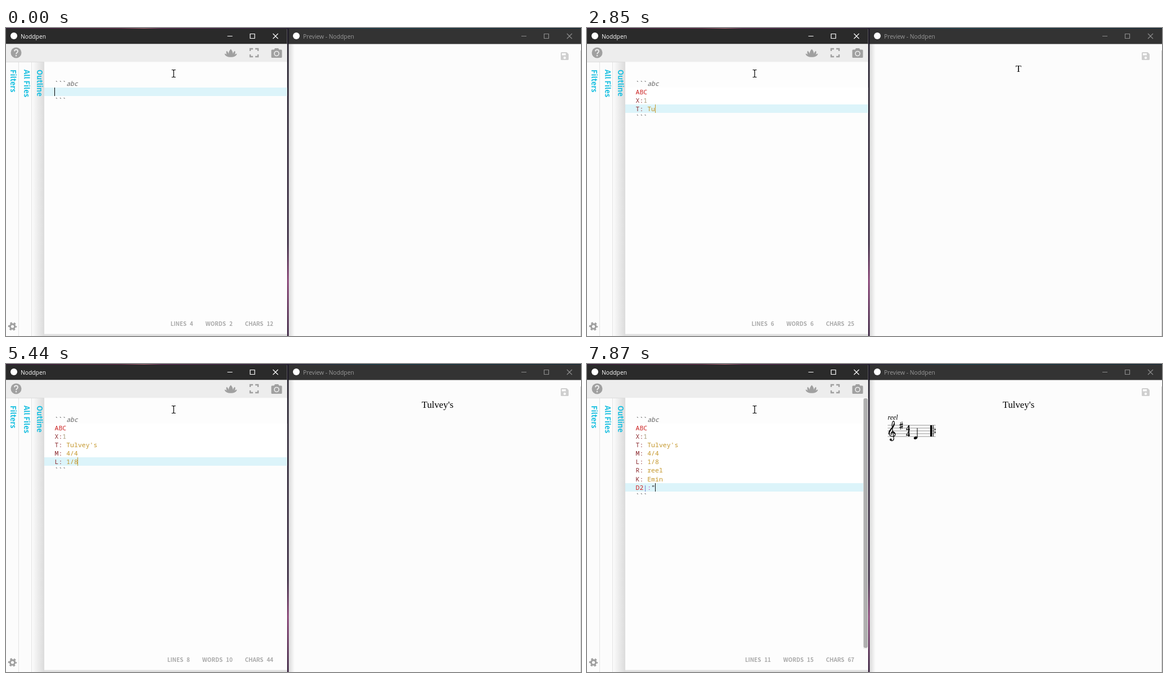
These frames come from a looping animation (1022 by 548 pixels, 8000 ms). An HTML page:

```html
<!DOCTYPE html>
<html lang="en">
<head>
<meta charset="utf-8">
<title>Live notation preview</title>
<style>
html, body { margin: 0; width: 100%; height: 100%; overflow: hidden; background: #fcfcfc; }
svg { display: block; }
text { white-space: pre; }
.bar { font: 10.3px "Open Sans", sans-serif; }
.tab { font: bold 13px "Noto Sans CJK JP", "Noto Sans", sans-serif; fill: #18bfe0; }
.count { font: bold 9.8px "Noto Sans CJK JP", "Noto Sans", sans-serif; fill: #a8a8a8; }
.code { font: 11.5px "Noto Sans Mono", monospace; fill: #555; }
.serif { font-family: "Liberation Serif", serif; }
.line { fill: none; stroke: #000; }
</style>
</head>
<body>
<svg width="1022" height="548" viewBox="0 0 1022 548">
  <defs>
    <linearGradient id="sky">
      <stop offset="0" stop-color="#35133c"/><stop offset=".2" stop-color="#6d2650"/>
      <stop offset=".24" stop-color="#b66a80"/><stop offset=".27" stop-color="#6a2560"/>
      <stop offset=".5" stop-color="#251a3c"/><stop offset=".65" stop-color="#0c4054"/>
      <stop offset="1" stop-color="#0d2435"/>
    </linearGradient>
    <linearGradient id="gap" x2="0" y2="1">
      <stop offset="0" stop-color="#1d1a26"/><stop offset=".7" stop-color="#2b1a33"/>
      <stop offset=".82" stop-color="#7d3169"/><stop offset="1" stop-color="#2d1634"/>
    </linearGradient>
    <linearGradient id="shade">
      <stop offset="0" stop-color="#000" stop-opacity="0"/><stop offset="1" stop-color="#000" stop-opacity=".13"/>
    </linearGradient>
    <g id="buttons" fill="none" stroke-width="1.2">
      <path d="M0 14.5h9M40.5 10.5h8v8h-8zM81 10l9 9m0-9l-9 9"/>
    </g>
  </defs>

  <rect width="1022" height="548" fill="#fcfcfc"/>
  <rect width="1022" height="2" fill="url(#sky)"/>

  <!-- preview window -->
  <rect x="502" y="1" width="520" height="27.5" fill="#333"/>
  <circle cx="516" cy="14" r="6" fill="#fff"/>
  <text class="bar" x="528" y="18.5" fill="#999">Preview - Noddpen</text>
  <use href="#buttons" x="916" stroke="#8c8c8c"/>
  <rect x="-513" y="28.5" width="10" height="520" fill="url(#shade)" transform="scale(-1 1)"/>
  <path d="M1021.5 40V548" stroke="#ccc"/>
  <path d="M987.5 43h9l3.500 3.500v9a1.500 1.500 0 0 1-1.500 1.500h-11a1.500 1.500 0 0 1-1.500-1.500v-11a1.500 1.500 0 0 1 1.500-1.500z" fill="#cfcfcf"/>
  <path d="M988 45h7v3.500h-7z" fill="#fcfcfc"/>
  <circle cx="993" cy="53" r="2.200" fill="#fcfcfc"/>
  <rect x="499.500" y="1" width="3" height="547" fill="url(#gap)"/>

  <!-- editor window -->
  <rect y="1" width="499.500" height="27.500" fill="#2a2a2a"/>
  <circle cx="14" cy="14" r="6" fill="#fff"/>
  <text class="bar" x="26" y="18.500" fill="#fff">Noddpen</text>
  <use href="#buttons" x="393.500" stroke="#fff"/>
  <rect y="28.500" width="499.500" height="32" fill="#ededed"/>
  <path d="M0 60.500H68" stroke="#ddd"/>
  <path d="M22.500 61V548M45.500 61V548" stroke="#e2e2e2"/>
  <rect x="46" y="61" width="22" height="487" fill="url(#shade)"/>
  <rect x="68" y="544" width="431.500" height="4" fill="#e0e0e0"/>
  <rect x="68" y="60.500" width="431.500" height="484" fill="#fdfdfd"/>

  <g fill="#a0a0a0">
    <circle cx="18" cy="44" r="9.500"/>
    <path d="M399.500 37.500c3 3 4 6 3.500 8.500 1-2.500 2.300-4.300 4-5.200 1 2.500.5 4.700-.6 6.700 1.200-1.200 2.600-1.800 4.100-1.700-1 4-5 6-11 6s-10-2-11-6c1.500-.1 2.900.5 4.100 1.700-1.100-2-1.600-4.200-.6-6.700 1.700.9 3 2.700 4 5.200-.5-2.500.5-5.500 3.500-8.500z"/>
    <path d="M473 38.500h3.500l1.500-2.500h6l1.500 2.500h3.500a1.500 1.500 0 0 1 1.500 1.500v11.500a1.500 1.500 0 0 1-1.500 1.500h-16a1.500 1.500 0 0 1-1.500-1.500V40a1.500 1.500 0 0 1 1.500-1.500z"/>
    <circle cx="11.500" cy="531" r="5.700"/>
    <circle cx="11.500" cy="531" r="6.200" fill="none" stroke="#a0a0a0" stroke-width="3" stroke-dasharray="3.250 3.243" stroke-dashoffset="1.600"/>
  </g>
  <circle cx="11.500" cy="531" r="2.600" fill="#fcfcfc"/>
  <circle cx="481" cy="45.500" r="4" fill="none" stroke="#ededed" stroke-width="1.600"/>
  <path d="M434 41v-4h5m4 0h5v4m0 6v4h-5m-4 0h-5v-4" fill="none" stroke="#a0a0a0" stroke-width="2.400"/>
  <path d="M15 41.500c0-4 6-4 6 0 0 2.200-3 2.500-3 5" fill="none" stroke="#ededed" stroke-width="1.900"/>
  <circle cx="18" cy="49.200" r="1.200" fill="#ededed"/>

  <text class="tab" transform="translate(8 74) rotate(90)">Filters</text>
  <text class="tab" transform="translate(31.500 74) rotate(90)">All Files</text>
  <text class="tab" transform="translate(54.500 74) rotate(90)">Outline</text>

  <g id="editor"></g>
  <g id="counts"></g>
  <g id="preview"></g>

  <path class="line" d="M294.500 74.500h2.500l1 1 1-1h2.500M294.500 87.500h2.500l1-1 1 1h2.500M298 75.500v11" stroke-width="1.200"/>
</svg>
<script>
const LOOP = 8000, COUNT_LAG = 60, PREVIEW_LAG = 120;
const SONG = `ABC
X:1
T: Tulvey's
M: 4/4
L: 1/8
R: reel
K: Emin
D2|:"`;
const KEY_TIMES = [
  990, 1300, 1480, 1730,
  1790, 1980, 2090, 2210,
  2320, 2430, 2550, 2660, 2790, 2980, 3100, 3220, 3340, 3470, 3590, 3650,
  3770, 3960, 4210, 4270, 4460, 4540, 4620,
  4950, 5140, 5210, 5300, 5370, 5440, 5700,
  5820, 5880, 5940, 6000, 6060, 6120, 6240, 6360,
  6540, 6630, 6720, 6840, 6920, 7000, 7080, 7230,
  7390, 7470, 7630, 7690, 7810];

const LEFT = 86.5, ADVANCE = 6.9;
const byId = id => document.getElementById(id);
const typedAt = t => SONG.slice(0, KEY_TIMES.filter(k => k <= t).length);
const rowTop = row => Math.floor(91 + 15.15 * row);
const rect = (x, y, w, h, fill, rx = 0) =>
  `<rect x="${x}" y="${y}" width="${w}" height="${h}" fill="${fill}" rx="${rx}"/>`;
const stroke = (d, width = 1, color = '#000') =>
  `<path class="line" d="${d}" style="stroke:${color};stroke-width:${width}"/>`;

// Splits a row into [text, colour] pieces
function colorize(row) {
  const field = row.match(/^([A-Z]:)(.*)/);
  if (field) {
    const value = field[1] === 'X:' ? '#a89a78' : '#c4962a';
    return [[field[1], '#8c2b30'], [field[2], value]].filter(p => p[0]);
  }
  const marks = { '|': '#6468c8', ':': '#c03ab0', '"': '#111' };
  return [...row].map(c => [c, marks[c] || '#cc2222']);
}

const codeText = (row, content) =>
  `<text class="code" x="${LEFT}" y="${rowTop(row) + 11.5}">${content}</text>`;

function drawEditor(text, caretOn) {
  const rows = text.split('\n'), last = rows.length;
  const scrolls = last >= 8, width = (scrolls ? 491 : 499.5) - 68;
  const top = rowTop(last), height = rowTop(last + 1) - top;
  let out = rect(68, 106, width, top - 106, '#fff') + rect(68, top, width, height, '#dcf4fa');
  out += codeText(0, '\`\`\`<tspan font-style="italic" fill="#666">abc</tspan>');
  rows.forEach((row, i) => {
    out += codeText(i + 1, colorize(row).map(([s, c]) => `<tspan fill="${c}">${s}</tspan>`).join(''));
  });
  out += codeText(last + 1, '\`\`\`');
  if (caretOn) {
    const row = rows[last - 1], color = row ? colorize(row).pop()[1] : '#000';
    out += rect(Math.floor(LEFT + row.length * ADVANCE), top, 1, height, color);
  }
  if (scrolls) {
    const end = last === 8 ? 505 : 491;
    out += rect(491, 61, 8.500, 446, '#f0f0f0') + rect(491.5, 61, 7.5, end - 61, '#b0b0b0', 3);
  }
  return out;
}

function drawCounts(text) {
  const words = (text.match(/\S+/g) || []).length + 2;
  const items = [['CHARS', text.length + 12], ['WORDS', words], ['LINES', text.split('\n').length + 3]];
  const group = byId('counts');
  group.innerHTML = items.map(([label, n]) =>
    `<text class="count" y="530.3" text-anchor="end">${label}<tspan dx="6">${n}</tspan></text>`).join('');
  let right = 475;
  for (const item of group.children) {
    item.setAttribute('x', right);
    right -= item.getComputedTextLength() + 28;
  }
}

// Staves are placed by their middle line; neighbouring lines are 5px apart
const staff = (y, end) =>
  [-10, -5, 0, 5, 10].map(d => stroke(`M534.500 ${y + d}H${end}`, .8, '#777')).join('');
const head = (x, y) =>
  `<ellipse rx="3.300" ry="2.300" transform="translate(${x} ${y}) rotate(-22)"/>`;
const clef = y => `<g transform="translate(535.300 ${y})">`
  + stroke('M5.500 7.500C4 3 8 .5 10.500 2.500C13.800 5 13 10 8.500 10C3 10.200 .5 6 2 1.500C3.500-3.500 10.500-7 11-13.500C11.200-17 9.500-18.500 8.200-16.500C6-13 6.800-9 7.500-4L10 13C10.500 17 7 18.500 4.500 17', 1.2)
  + stroke('M1.800 6C.8 1 4-2 6.500-4.500C9-7 10.500-9.500 10.700-13M5.500 3.500C7.500 1.500 11 2 12 5', 1.9)
  + '<circle cx="4.600" cy="15.500" r="1.900"/></g>';

function beamedNotes(count) {
  const y = 82, notes = [[559, 84.5], [578, 82], [597, 97]].slice(0, count);
  const beamY = x => 66 + (x - 562) * .08;
  const endX = notes[count - 1][0] + 3;
  let out = staff(y, endX + 13) + clef(y);
  for (const [x, ny] of notes) out += head(x, ny) + stroke(`M${x + 3} ${ny}V${beamY(x + 3)}`);
  if (count > 2) out += stroke('M592 97h10', .9);
  return out + stroke(`M561.500 ${beamY(562)}L${endX + .5} ${beamY(endX)}`, 2.6);
}

function tuneStaff(music) {
  const y = 119, bar = music.includes('|'), repeat = music.includes(':');
  let out = staff(y, repeat ? 619.5 : bar ? 608 : 600) + clef(y);
  out += stroke('M557.300 103.500v13M560 102.500v13', .9) + stroke('M555.500 108.500l6-1.800m-6 6.300l6-1.800', 1.7);
  for (const base of [118.6, 128.6])
    out += `<text class="serif" x="567" y="${base}" font-size="14.500" font-weight="bold">4</text>`;
  out += head(584, 131.5) + stroke('M587 131V114');
  if (music === 'D') out += stroke('M587 114c0 4 5 5 3 10', 1.2);
  if (repeat) {
    out += rect(610, 109, 3.5, 20, '#000') + stroke('M615.500 109v20', .9);
    for (const dy of [-2.5, 2.5]) out += `<circle cx="618.500" cy="${y + dy}" r="1.200"/>`;
  } else if (bar) out += stroke('M607.500 109v20', .9);
  return out;
}

function drawPreview(text) {
  if (!text.includes('X:')) {
    const notes = text.split('\n')[0].length;
    return notes > 1 ? beamedNotes(notes) : '';
  }
  const find = pattern => (text.match(pattern) || [])[1] || '';
  const music = find(/Emin\n(.+)/);
  return `<text class="serif" x="767" y="77.500" font-size="16.800" text-anchor="middle">${find(/T: (.*)/)}</text>`
    + `<text class="serif" x="534.500" y="98.700" font-size="11.900" font-style="italic">${find(/R: (.*)/)}</text>`
    + (music && tuneStaff(music));
}

let shown = '';
function frame() {
  const t = performance.now() % LOOP;
  const typed = typedAt(t), counted = typedAt(t - COUNT_LAG), rendered = typedAt(t - PREVIEW_LAG);
  const caretOn = t < 60 || t >= 990;
  const state = [typed.length, counted.length, rendered.length, caretOn].join();
  if (state !== shown) {
    byId('editor').innerHTML = drawEditor(typed, caretOn);
    drawCounts(counted);
    byId('preview').innerHTML = drawPreview(rendered);
    shown = state;
  }
  requestAnimationFrame(frame);
}
frame();
</script>
</body>
</html>
```
